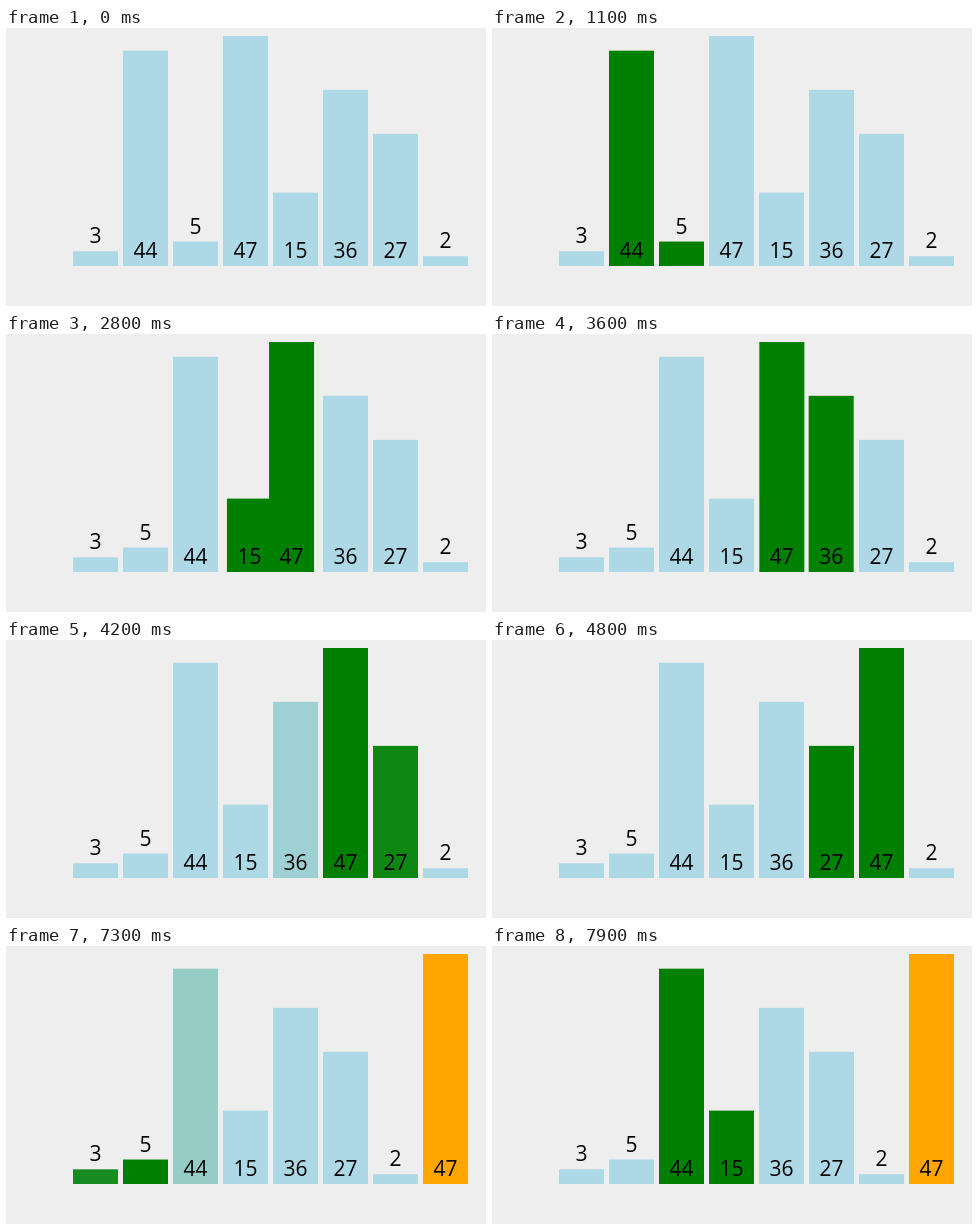
An HTML page that plays this animation: 480 px wide and 278 px high, repeating every 8 s.

```html
<!DOCTYPE html>
<html lang="en">
<head>
<meta charset="utf-8">
<title>Bubble sort</title>
<style>
  html, body { margin: 0; width: 100%; height: 100%; overflow: hidden; background: #eee; }
  svg { display: block; width: 480px; height: 278px; }
  text { font: 21px "Open Sans", "Noto Sans", sans-serif; text-anchor: middle; }
</style>
</head>
<body>
<svg id="stage" viewBox="0 0 480 278"></svg>
<script>
const LOOP = 8000, BASE = 238, LEFT = 67, PITCH = 50, WIDTH = 45;
const VALUES = [3, 44, 5, 47, 15, 36, 27, 2];
const UNIT = 230 / 47;

const IDLE = [173, 216, 230], ACTIVE = [0, 128, 0], SORTED = [255, 165, 0];

// Each step: start, duration, and the change it makes to the bars.
const paint = (start, ...colors) => ({ start, length: 200, colors });
const swap = (start, a, b, length = 200) => ({ start, length, pair: [a, b] });
const STEPS = [
  paint(400, [3, ACTIVE], [44, ACTIVE]),
  paint(855, [3, IDLE], [5, ACTIVE]),
  swap(1270, 44, 5, 300),
  paint(1800, [5, IDLE], [47, ACTIVE]),
  paint(2200, [44, IDLE], [15, ACTIVE]),
  swap(2655, 47, 15),
  paint(3100, [15, IDLE], [36, ACTIVE]),
  swap(3577, 47, 36),
  paint(4055, [36, IDLE], [27, ACTIVE]),
  swap(4555, 47, 27),
  paint(5000, [27, IDLE], [2, ACTIVE]),
  swap(5455, 47, 2),
  paint(5900, [2, IDLE], [47, SORTED]),
  paint(6800, [3, ACTIVE], [5, ACTIVE]),
  paint(7236, [3, IDLE], [44, ACTIVE]),
  paint(7700, [5, IDLE], [15, ACTIVE])
];

const mix = (a, b, p) => a + (b - a) * p;
const ease = p => p < 0.5 ? 4 * p ** 3 : 1 - 4 * (1 - p) ** 3;

function add(parent, tag, attributes = {}) {
  const node = document.createElementNS("http://www.w3.org/2000/svg", tag);
  for (const name in attributes) node.setAttribute(name, attributes[name]);
  return parent.appendChild(node);
}

const stage = document.getElementById("stage");
const bars = VALUES.map(value => {
  const height = value * UNIT, top = BASE - height;
  const group = add(stage, "g");
  const rect = add(group, "rect", { y: top, width: WIDTH, height });
  const label = add(group, "text", { x: WIDTH / 2, y: value < 10 ? top - 8 : 230 });
  label.textContent = value;
  return { group, rect };
});

function stateAt(time) {
  const state = new Map(VALUES.map((value, slot) => [value, { slot, color: IDLE }]));
  for (const { start, length, colors = [], pair } of STEPS) {
    if (time <= start) break;
    const p = ease(Math.min(1, (time - start) / length));
    for (const [value, color] of colors) {
      const bar = state.get(value);
      bar.color = bar.color.map((channel, i) => mix(channel, color[i], p));
    }
    if (pair) {
      const [a, b] = pair.map(value => state.get(value));
      [a.slot, b.slot] = [mix(a.slot, b.slot, p), mix(b.slot, a.slot, p)];
    }
  }
  return state;
}

function draw() {
  const state = stateAt(performance.now() % LOOP);
  bars.forEach(({ group, rect }, i) => {
    const { slot, color } = state.get(VALUES[i]);
    group.setAttribute("transform", `translate(${LEFT + slot * PITCH} 0)`);
    rect.setAttribute("fill", `rgb(${color.map(Math.round)})`);
  });
  requestAnimationFrame(draw);
}
draw();
</script>
</body>
</html>
```
